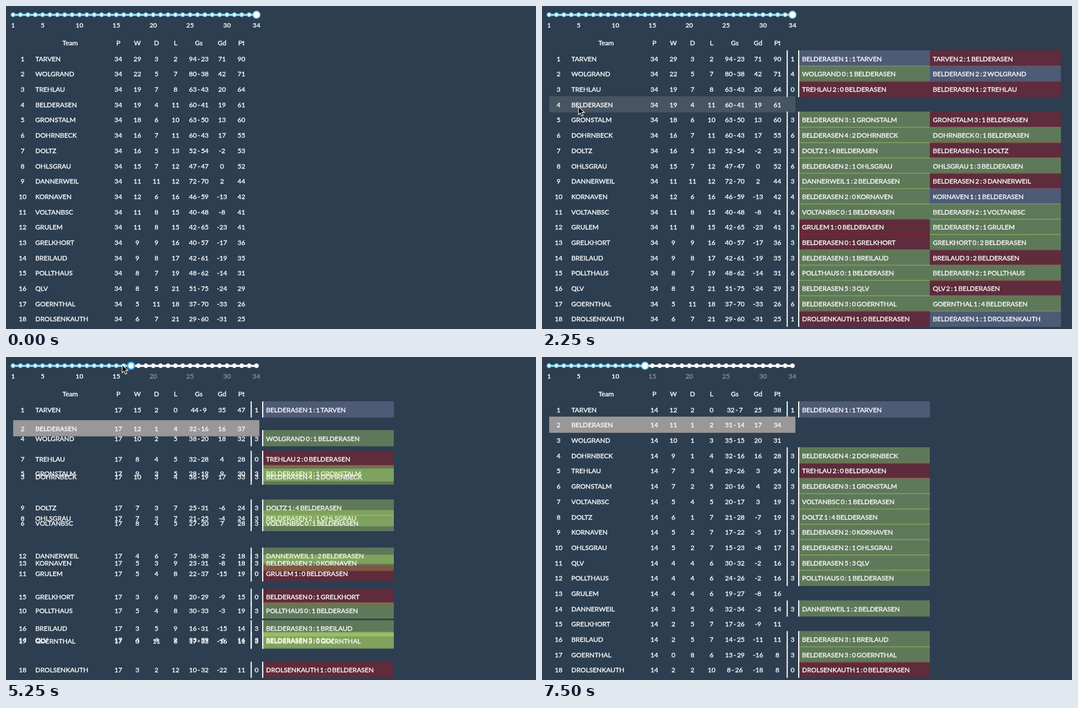
An HTML page that plays this animation: 958x584 px, repeating every 7750 ms.

```html
<!DOCTYPE html>
<html lang="en">
<head>
<meta charset="utf-8">
<title>League table by round</title>
<style>
  html, body { margin: 0; width: 100%; height: 100%; overflow: hidden; background: #2c3e50; }
  svg { display: block; width: 958px; height: 584px; }
  text {
    font: 12px Lato, sans-serif; word-spacing: -1.4px; text-anchor: middle;
    fill: #f8f8f8; stroke: #f8f8f8; stroke-width: .42px;
  }
  .left { text-anchor: start; }
  .on { font-weight: 700; fill: #fff; stroke: none; }
  .off { fill: #8b939b; stroke: #8b939b; stroke-width: .3px; }
  .win { fill: rgba(205, 255, 110, .305); }
  .draw { fill: rgba(155, 157, 201, .305); }
  .loss { fill: rgba(205, 6, 14, .305); }
</style>
</head>
<body>
<svg id="stage" viewBox="0 0 958 584"></svg>
<script>
const LOOP = 7750, STEP = 250;
const HERO = 3, TOP = 95.3, PITCH = 27.69, ROW_H = 29.3;
const stage = document.getElementById('stage');

const names = `TARVEN WOLGRAND TREHLAU BELDERASEN GRONSTALM DOHRNBECK
  DOLTZ OHLSGRAU DANNERWEIL KORNAVEN VOLTANBSC GRULEM GRELKHORT
  BREILAUD POLLTHAUS QLV GOERNTHAL DROLSENKAUTH`.split(/\s+/);

// Won, drawn, goals for, goals against
const parse = s => s.split(',').map(r => r.trim().split(/[ -]/).map(Number));
const tables = {
  34: parse(`29 3 94-23, 22 5 80-38, 19 7 63-43, 19 4 60-41, 18 6 63-50, 16 7 60-43,
    16 5 52-54, 15 7 47-47, 11 11 72-70, 12 6 46-59, 11 8 40-48, 11 8 42-65,
    9 9 40-57, 9 8 42-61, 8 7 48-62, 8 5 51-75, 5 11 37-70, 6 7 29-60`),
  17: parse(`15 2 44-9, 10 2 38-20, 8 4 32-28, 12 1 32-16, 9 3 28-19, 10 3 36-19,
    7 3 25-31, 7 3 21-25, 4 6 36-38, 5 3 23-31, 8 4 27-20, 5 4 22-37,
    3 6 20-29, 3 5 16-31, 5 4 30-33, 4 4 33-39, 0 11 17-33, 3 2 10-32`),
  14: parse(`12 2 32-7, 10 1 35-15, 7 3 29-26, 11 1 31-14, 7 2 20-16, 9 1 32-16,
    6 1 21-28, 5 2 15-23, 3 5 32-34, 5 2 17-22, 5 4 20-17, 4 4 19-27,
    2 5 17-26, 2 5 14-25, 4 4 24-26, 4 4 30-32, 0 8 13-29, 2 2 8-26`)
};

// Round, venue and score of the first match, then score of the return match
const fixtures = `8 h 1:1 2:1, 15 a 0:1 2:2, 4 a 2:0 1:2, -, 5 h 3:1 3:1, 3 h 4:2 0:1,
  6 a 1:4 0:1, 10 h 2:1 1:3, 9 a 1:2 2:3, 7 h 2:0 1:1, 13 a 0:1 2:1, 17 a 1:0 2:1,
  16 h 0:1 0:2, 1 h 3:1 3:2, 2 a 0:1 2:1, 12 h 5:3 2:1, 14 h 3:0 1:4, 11 a 1:0 1:1`
  .split(',').map(s => s.trim().split(' '));

// Row slots while the ranking reshuffles
const slotsA = [0, 1.88, 3.23, 1.23, 4.17, 4.39, 6.41, 7.1, 9.55, 10.02, 7.42, 10.71,
  12.23, 14.29, 13.13, 15.05, 15.11, 17];
const slotsB = [0, 2, 4.19, 1, 4.57, 3.02, 7.03, 8.4, 11.94, 8.94, 6.02, 12.16,
  14, 15, 10.53, 10.93, 16, 17];

const pointerPath = [[500, 151, 87], [750, 120, 122], [1000, 84, 162], [1250, 66, 182],
  [2250, 66, 182], [3000, 438, 29], [3500, 448, 21], [4250, 448, 21], [4500, 436, 17],
  [5250, 210, 14], [5500, 191, 14], [5750, 183, 14], [6750, 183, 14], [7250, 815, 566]];
const roundPath = [[4250, 34], [4500, 33], [5250, 17], [5500, 15], [5750, 14]];
const rowPath = [[1750, 0], [2250, .25], [3250, 1]];

function sample(keys, t) {
  const i = keys.findIndex(k => k[0] > t);
  if (i === 0) return keys[0].slice(1);
  if (i < 0) return keys[keys.length - 1].slice(1);
  const a = keys[i - 1], b = keys[i], f = (t - a[0]) / (b[0] - a[0]);
  return a.slice(1).map((v, n) => v + (b[n + 1] - v) * f);
}

function standings(round) {
  const [lo, hi] = round < 17 ? [14, 17] : [17, 34];
  const f = (round - lo) / (hi - lo);
  const rows = names.map((name, i) => {
    const [w, d, gf, ga] = tables[lo][i].map((v, n) => Math.round(v + (tables[hi][i][n] - v) * f));
    return { i, w, d, l: Math.max(0, round - w - d), gf, ga, gd: gf - ga, pt: 3 * w + d };
  });
  [...rows].sort((a, b) => b.pt - a.pt || b.gd - a.gd || b.gf - a.gf || a.i - b.i)
    .forEach((r, n) => r.rank = n + 1);
  return rows;
}
const finalRank = standings(14).map(r => r.rank - 1);

const text = (x, y, s, cls = '') => `<text x="${x}" y="${y}" class="${cls}">${s}</text>`;
const rect = (x, y, w, h, attr) => `<rect x="${x}" y="${y}" width="${w}" height="${h}" ${attr}/>`;
const dot = (x, r, fill, stroke, w) =>
  `<circle cx="${x}" cy="15.8" r="${r}" fill="${fill}" stroke="${stroke}" stroke-width="${w}"/>`;

function slider(round, hot) {
  const at = n => 12.8 + 13.333 * (n - 1), x = at(round), blue = '#87d6f2', white = '#f4f4f4';
  let s = rect(13, 14, 440, 4, `fill="${white}"`) + rect(13, 14, x - 13, 4, `fill="${blue}"`);
  for (let n = 1; n <= 34; n++) {
    s += dot(at(n), 3.3, '#fff', n <= round ? blue : white, 2);
    if (n === 1 || n === 34 || n % 5 === 0) s += text(at(n), 39.3, n, n <= round ? 'on' : 'off');
  }
  return s + dot(x, 6.2, '#fff', hot ? '#3fb2ee' : blue, hot ? 2.6 : 2);
}

function matches(i, round, y, base) {
  const [day, venue, ...scores] = fixtures[i];
  let s = '', points = 0, shown = 0;
  scores.forEach((score, leg) => {
    if (round < +day + 17 * leg) return;
    const home = (venue === 'h') === (leg === 0);
    const [a, b] = score.split(':').map(Number);
    const diff = home ? a - b : b - a;
    const pair = home ? [names[HERO], names[i]] : [names[i], names[HERO]];
    const x = leg ? 701 : 464.5;
    points += diff > 0 ? 3 : diff === 0 ? 1 : 0;
    shown++;
    s += rect(x, y, leg ? 237 : 236.5, ROW_H, `class="${diff > 0 ? 'win' : diff ? 'loss' : 'draw'}"`)
      + text(leg ? 706.5 : 470, base, `${pair[0]} ${a} : ${b} ${pair[1]}`, 'left');
  });
  if (!shown) return '';
  return s + rect(442.2, y, 2, ROW_H, 'fill="#fff"') + rect(463, y, 2, ROW_H, 'fill="#fff"')
    + text(453, base, points);
}

function row(r, round, t) {
  const i = r.i;
  const slot = sample([[4250, i], [5250, slotsA[i]], [5750, slotsB[i]], [6250, finalRank[i]]], t)[0];
  const mid = TOP + PITCH * slot, y = mid - 15.2, base = mid + 4.4;
  let s = '';
  if (i === HERO) {
    const glow = sample(rowPath, t)[0];
    if (glow) s += rect(13, y, 445, ROW_H, `fill="#999797" fill-opacity="${glow}"`);
  } else if (t >= 2000) {
    s += `<g opacity="${t < 2250 ? .6 : 1}">${matches(i, round, y, base)}</g>`;
  }
  return s + text(30, base, r.rank) + text(53, base, names[i], 'left')
    + text(203, base, round) + text(237.5, base, r.w) + text(272, base, r.d)
    + text(306.5, base, r.l) + text(348.5, base, `${r.gf} - ${r.ga}`)
    + text(390.5, base, r.gd) + text(425.5, base, r.pt);
}

function pointer(t) {
  if (t < 500 || t >= 7500) return '';
  const [x, y] = sample(pointerPath, t);
  return `<path transform="translate(${x} ${y})" d="M0 0V14.5L3.4 11.4 5.8 17 8.5 15.8 6.1 10.4H10.6Z"
    fill="#000" stroke="#fff" stroke-width="1.1"/>`;
}

const heads = [['Team', 116], ['P', 203], ['W', 237.5], ['D', 272], ['L', 306.5],
  ['Gs', 348.5], ['Gd', 390.5], ['Pt', 425.5]];

function draw(t) {
  const round = Math.round(sample(roundPath, t)[0]);
  stage.innerHTML = slider(round, t >= 3500 && t < 7000)
    + heads.map(([s, x]) => text(x, 71.3, s)).join('')
    + standings(round).map(r => row(r, round, t)).join('')
    + pointer(t);
}

const start = performance.now();
let last = -1;
function tick() {
  const t = Math.floor(((performance.now() - start) % LOOP) / STEP) * STEP;
  if (t !== last) draw(last = t);
  requestAnimationFrame(tick);
}
tick();
</script>
</body>
</html>
```
